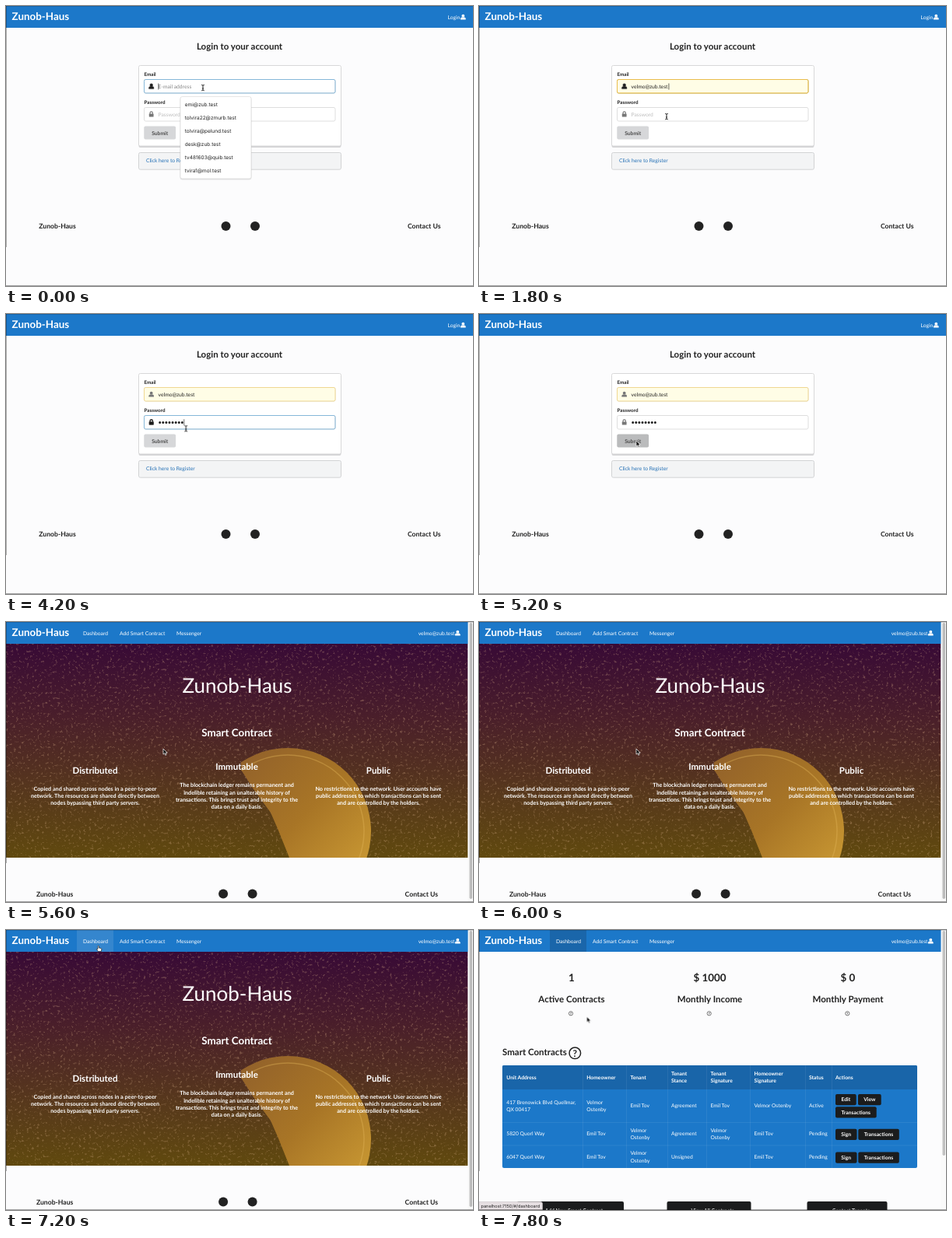
An HTML page for the animation above (8 s loop, 600 by 360 pixels).

```html
<!DOCTYPE html>
<html lang="en">
<head>
<meta charset="utf-8">
<title>Rental dashboard login</title>
<style>
html, body { margin: 0; width: 100%; height: 100%; overflow: hidden; background: #fcfcfd; }
svg { display: block; width: 100vw; height: 100vh; text-rendering: geometricPrecision; }
text { font: 6.72px Lato, sans-serif; fill: #212121; white-space: pre; }
.b, .b text { font-weight: 700; }
.c, .c text { text-anchor: middle; }
.w text, text.w { fill: #fff; }
.label { font-size: 6.3px; font-weight: 700; }
.brand { font-size: 13.4px; font-weight: 700; fill: #fff; }
.h1 { font-size: 13.4px; font-weight: 700; }
.h2 { font-size: 11.5px; font-weight: 700; }
.h4 { font-size: 7.2px; }
.foot text { font-size: 8.65px; font-weight: 700; }
.sys text, text.sys { font-family: Inter, sans-serif; font-size: 6.5px; }
.field { fill: #fff; stroke: #dedede; }
.focus { fill: none; stroke: #85b7d9; }
.btn { fill: #1b1c1d; }

/* 8 s loop, 200 ms = 2.5 % */
.k, .k tspan { animation: 8s step-end infinite; }
#login { animation-name: login }
#home { animation-name: home }
#dash { animation-name: dash }
#list { animation-name: first }
#hint { animation-name: hint }
#pick { animation-name: pick }
.first { animation-name: first }
#mail tspan { fill-opacity: 0; }
#mail .l1 { animation-name: l1 }
#mail .l2 { animation-name: l2 }
#mail .l3 { animation-name: l3 }
#mail .l4 { animation-name: l4 }
#filled { animation-name: filled }
.mailOn { animation-name: mailOn }
.passOn { animation-name: passOn }
#caret1 { animation-name: caret1 }
#passHint { animation-name: passHint }
#cover { animation-name: cover }
#submit { animation-name: submit }
#hover { animation-name: hover }
#mouse { animation-name: mouse }
#beam { animation-name: beam }
#arrow { animation-name: arrow }
#hand { animation-name: hand }

@keyframes login { 0% { opacity: 1 } 70%, to { opacity: 0 } }
@keyframes home { 0% { opacity: 0 } 70% { opacity: 1 } 92.5%, to { opacity: 0 } }
@keyframes dash { 0% { opacity: 0 } 92.5%, to { opacity: 1 } }
@keyframes first { 0% { opacity: 1 } 5%, to { opacity: 0 } }
@keyframes hint { 0% { opacity: 0 } 5% { opacity: 1 } 15%, to { opacity: 0 } }
@keyframes pick { 0% { opacity: 0 } 12.5%, to { opacity: 1 } }
@keyframes l1 { 0% { fill-opacity: 0 } 5%, to { fill-opacity: 1 } }
@keyframes l2 { 0% { fill-opacity: 0 } 7.5%, to { fill-opacity: 1 } }
@keyframes l3 { 0% { fill-opacity: 0 } 10%, to { fill-opacity: 1 } }
@keyframes l4 { 0% { fill-opacity: 0 } 12.5%, to { fill-opacity: 1 } }
@keyframes filled { 0% { opacity: 0 } 12.5%, to { opacity: 1 } }
@keyframes mailOn { 0% { opacity: 1 } 25%, to { opacity: 0 } }
@keyframes passOn { 0% { opacity: 0 } 25% { opacity: 1 } 65%, to { opacity: 0 } }
@keyframes caret1 {
  0% { transform: none } 5% { transform: translateX(3.4px) } 7.5% { transform: translateX(7px) }
  10% { transform: translateX(8.6px) } 12.5%, to { transform: translateX(48px) }
}
@keyframes passHint { 0% { opacity: 1 } 30%, to { opacity: 0 } }
@keyframes cover {
  0% { transform: none } 30% { transform: translateX(4.1px) } 32.5% { transform: translateX(8.2px) }
  35% { transform: translateX(12.3px) } 37.5% { transform: translateX(16.4px) } 40% { transform: translateX(20.5px) }
  42.5% { transform: translateX(28.7px) } 45%, to { transform: translateX(32.8px) }
}
@keyframes submit { 0% { fill: #d6d7d9 } 60% { fill: #cacbcd } 65%, to { fill: #babbbc } }
@keyframes hover { 0% { opacity: 0 } 90%, to { opacity: 1 } }
@keyframes mouse {
  0% { transform: translate(253px, 105px) }
  20% { transform: translate(247px, 124px) }
  22.5% { transform: translate(241px, 142px) }
  50% { transform: translate(241px, 142px); animation-timing-function: steps(4) }
  60% { transform: translate(202px, 163px) }
  80% { transform: translate(202px, 163px); animation-timing-function: steps(4) }
  90% { transform: translate(118px, 20px) }
  95% { transform: translate(124px, 60px) }
  97.5%, to { transform: translate(138.5px, 111.5px) }
}
@keyframes beam {
  0% { opacity: 1 } 5% { opacity: 0 } 20% { opacity: 1 } 27.5% { opacity: 0 }
  50% { opacity: 1 } 55%, to { opacity: 0 }
}
@keyframes arrow { 0% { opacity: 0 } 55% { opacity: 1 } 90% { opacity: 0 } 95%, to { opacity: 1 } }
@keyframes hand { 0% { opacity: 0 } 90% { opacity: 1 } 95%, to { opacity: 0 } }
</style>
</head>
<body>
<svg viewBox="0 0 600 360">
  <defs>
    <g id="user"><circle cy="-1.5" r="1.9"/><path d="M-3.3 3.2V2Q-3.3.3-1.5.3h3Q3.3.3 3.3 2v1.2z"/></g>
    <g id="lock"><rect x="-2.9" y="-.4" width="5.8" height="4" rx=".6"/><path d="M-1.7 0v-1.4a1.7 1.7 0 0 1 3.4 0V0" fill="none" stroke="currentColor" stroke-width="1.1"/></g>
    <g id="help"><circle r="2.6" fill="none" stroke="#212121" stroke-width=".6"/><text class="b c" y="1.5" style="font-size:4.2px">?</text></g>
    <g id="foot" class="foot">
      <text x="42.3" y="286">Zunob-Haus</text>
      <circle cx="282.5" cy="283" r="6" fill="#222"/>
      <circle cx="320" cy="283" r="6" fill="#222"/>
      <text x="516" y="286">Contact Us</text>
    </g>
    <g id="menu" class="w">
      <text x="99" y="16.8">Dashboard</text>
      <text x="146" y="16.8">Add Smart Contract</text>
      <text x="219" y="16.8">Messenger</text>
      <text x="576.5" y="16.8" text-anchor="end">velmo@zub.test</text>
      <use href="#user" x="580.3" y="14.2" fill="#fff"/>
    </g>
    <linearGradient id="soil" x2="0" y2="1">
      <stop stop-color="#380a36"/><stop offset=".35" stop-color="#4a1f2a"/>
      <stop offset=".7" stop-color="#57381c"/><stop offset="1" stop-color="#60490e"/>
    </linearGradient>
    <linearGradient id="gold" x2="1" y2="1">
      <stop stop-color="#8a5a2c"/><stop offset=".5" stop-color="#a87526"/><stop offset="1" stop-color="#d8a838"/>
    </linearGradient>
    <filter id="grain" x="0" y="0" width="1" height="1">
      <feTurbulence type="fractalNoise" baseFrequency=".3" numOctaves="4" seed="5"/>
      <feColorMatrix values="0 0 0 0 .68  0 0 0 0 .42  0 0 0 0 .24  5 0 0 0 -3"/>
    </filter>
    <clipPath id="dig"><path d="M302 150H480V303H364L350 268 340 245 318 215 302 190z"/></clipPath>
  </defs>

  <rect width="600" height="360" fill="#fcfcfd"/>
  <rect width="600" height="28" fill="#1c78c9"/>
  <text class="brand" x="7.6" y="18.4">Zunob-Haus</text>

  <g id="login" class="k">
    <text class="w" x="567.5" y="16.8">Login</text>
    <use href="#user" x="587.3" y="14.2" fill="#fff"/>
    <text class="h2 c" x="300" y="56.3">Login to your account</text>

    <rect x="170.5" y="77.5" width="260" height="104.5" rx="2" fill="#d4d4d5"/>
    <rect x="170.5" y="76.5" width="260" height="103.5" rx="2" fill="#fff" stroke="#d8d8d9"/>

    <text class="label" x="177.5" y="89.6">Email</text>
    <rect class="field" x="177.5" y="94.5" width="245.5" height="17.5" rx="2"/>
    <rect class="focus k mailOn" x="177.5" y="94.5" width="245.5" height="17.5" rx="2"/>
    <g id="filled" class="k">
      <rect x="177.5" y="94.5" width="245.5" height="17.5" rx="2" fill="#fffde6" stroke="#f0d892"/>
      <rect class="k mailOn" x="177.5" y="94.5" width="245.5" height="17.5" rx="2" fill="none" stroke="#e9bd4c"/>
    </g>
    <use href="#user" x="186.7" y="103.2" fill="#777"/>
    <use class="k mailOn" href="#user" x="186.7" y="103.2" fill="#1c1c1c"/>
    <text class="k first" x="195.6" y="105.7" style="fill:#878787">E-mail address</text>
    <text id="mail" class="k" x="195.6" y="105.7"><tspan class="l1">v</tspan><tspan class="l2">e</tspan><tspan class="l3">l</tspan><tspan class="l4">mo@zub.test</tspan></text>
    <g class="k mailOn"><path id="caret1" class="k" d="M195.9 99.5v8" stroke="#222" stroke-width=".7"/></g>

    <text class="label" x="177.5" y="125.6">Password</text>
    <rect class="field" x="177.5" y="130.5" width="245.5" height="17.5" rx="2"/>
    <path d="M197.7 139.4h29" stroke="#1c1c1c" stroke-width="3" stroke-linecap="round" stroke-dasharray="0 4.1"/>
    <g id="cover" class="k">
      <rect x="195.5" y="134" width="36" height="11" fill="#fff"/>
      <path class="k passOn" d="M195.9 135.3v8" stroke="#222" stroke-width=".7"/>
    </g>
    <text id="passHint" class="k" x="195.6" y="141.7" style="fill:#bdbdbd">Password</text>
    <rect class="focus k passOn" x="177.5" y="130.5" width="245.5" height="17.5" rx="2"/>
    <use href="#lock" x="186.7" y="139" fill="#777" color="#777"/>
    <use class="k passOn" href="#lock" x="186.7" y="139" fill="#1c1c1c" color="#1c1c1c"/>

    <rect id="submit" class="k" x="177.3" y="154.5" width="40.8" height="17" rx="2"/>
    <text class="b c" x="197.7" y="165.5" style="fill:#4c4c4c">Submit</text>

    <rect x="170.5" y="188.5" width="260" height="21.7" rx="2" fill="#f3f4f5" stroke="#d2d3d4"/>
    <text x="180" y="201.4" style="fill:#2470b6">Click here to Register</text>
    <use href="#foot"/>

    <g id="list" class="k sys">
      <rect x="223.5" y="117" width="92" height="106.5" rx="3" fill="#000" opacity=".1"/>
      <rect x="224" y="116.5" width="91" height="105.5" rx="2.5" fill="#fff" stroke="#d5d5d5" stroke-width=".6"/>
      <text x="229.8" y="129">emi@zub.test</text>
      <text x="229.8" y="146">tolvira22@zmurb.test</text>
      <text x="229.8" y="163">tolvira@pelund.test</text>
      <text x="229.8" y="180">desk@zub.test</text>
      <text x="229.8" y="197">tv481603@quib.test</text>
      <text x="229.8" y="214">tvira1@mol.test</text>
    </g>
    <g id="hint" class="k sys">
      <rect x="224" y="116.5" width="91" height="20.5" rx="2.5" fill="#fff" stroke="#d5d5d5" stroke-width=".6"/>
      <rect id="pick" class="k" x="224.5" y="118.5" width="90" height="16.5" fill="#e6e6e6"/>
      <text x="229.8" y="129">velmo@zub.test</text>
    </g>
  </g>

  <g id="home" class="k">
    <rect id="hover" class="k" x="91" width="47" height="28" fill="#3586ce"/>
    <use href="#menu"/>
    <rect y="28" width="593.5" height="275" fill="url(#soil)"/>
    <rect y="28" width="593.5" height="275" filter="url(#grain)" opacity=".32"/>
    <g clip-path="url(#dig)">
      <circle cx="362" cy="269" r="107" fill="url(#gold)"/>
      <circle cx="362" cy="269" r="98" fill="none" stroke="#e0b557" stroke-opacity=".4" stroke-width="1.5"/>
    </g>
    <g class="w c b">
      <text x="297" y="91" style="font-size:26px;font-weight:400">Zunob-Haus</text>
      <text class="h1" x="296.5" y="147">Smart Contract</text>
      <text class="h2" x="114.5" y="194.6">Distributed</text>
      <text class="h2" x="296.5" y="190">Immutable</text>
      <text class="h2" x="478.5" y="194.6">Public</text>
      <text class="h4" y="217"><tspan x="114.5">Copied and shared across nodes in a peer-to-peer</tspan><tspan x="114.5" dy="9.2">network. The resources are shared directly between</tspan><tspan x="114.5" dy="9.2">nodes bypassing third party servers.</tspan></text>
      <text class="h4" y="212.4"><tspan x="296.5">The blockchain ledger remains permanent and</tspan><tspan x="296.5" dy="9.2">indelible retaining an unalterable history of</tspan><tspan x="296.5" dy="9.2">transactions. This brings trust and integrity to the</tspan><tspan x="296.5" dy="9.2">data on a daily basis.</tspan></text>
      <text class="h4" y="217"><tspan x="478.5">No restrictions to the network. User accounts have</tspan><tspan x="478.5" dy="9.2">public addresses to which transactions can be sent</tspan><tspan x="478.5" dy="9.2">and are controlled by the holders.</tspan></text>
    </g>
    <use href="#foot" x="-3.4" y="66.5"/>
    <rect x="593.5" width="6.5" height="360" fill="#f8f8f8"/>
    <rect x="595.5" y="1" width="3.6" height="355" rx="1.8" fill="#bcbcbc"/>
  </g>

  <g id="dash" class="k">
    <rect x="91" width="47" height="28" fill="#1a66aa"/>
    <use href="#menu"/>
    <g class="c">
      <text class="h1" x="119" y="66">1</text>
      <text class="h1" x="296.5" y="66">$ 1000</text>
      <text class="h1" x="474" y="66">$ 0</text>
      <text class="h2" x="119" y="93">Active Contracts</text>
      <text class="h2" x="296.5" y="93">Monthly Income</text>
      <text class="h2" x="474" y="93">Monthly Payment</text>
    </g>
    <use href="#help" x="118" y="107.3"/>
    <use href="#help" x="295.7" y="107.3"/>
    <use href="#help" x="473.3" y="107.3"/>
    <text class="h2" x="30" y="161.3">Smart Contracts</text>
    <circle cx="123.3" cy="158.3" r="7.3" fill="none" stroke="#212121" stroke-width="1.5"/>
    <text class="b c" x="123.3" y="162.5" style="font-size:12px">?</text>

    <rect x="30" y="174" width="533" height="132" rx="2" fill="#1c78c9"/>
    <path d="M30 205v-29q0-2 2-2h529q2 0 2 2v29z" fill="#1965a9"/>
    <path d="M133.5 174v132M189.5 174v132M242.5 174v132M292.5 174v132M348.5 174v132M419.5 174v132M453.5 174v132M30 247.5h533M30 277h533" stroke="#fff" stroke-opacity=".1" stroke-width=".7"/>
    <g class="w b">
      <text x="35.3" y="191.8">Unit Address</text>
      <text x="138.3" y="191.8">Homeowner</text>
      <text x="194.5" y="191.8">Tenant</text>
      <text x="247" y="187">Tenant<tspan x="247" dy="9.4">Stance</tspan></text>
      <text x="297.5" y="187">Tenant<tspan x="297.5" dy="9.4">Signature</tspan></text>
      <text x="353.5" y="187">Homeowner<tspan x="353.5" dy="9.4">Signature</tspan></text>
      <text x="424" y="191.8">Status</text>
      <text x="458" y="191.8">Actions</text>
    </g>
    <g class="w">
      <text x="35.3" y="223.8">417 Brenowick Blvd Quellmar,<tspan x="35.3" dy="9.2">QX 00417</tspan></text>
      <text x="138.3" y="223.8">Velmor<tspan x="138.3" dy="9.2">Ostenby</tspan></text>
      <text x="194.5" y="228.4">Emil Tov</text>
      <text x="247" y="228.4">Agreement</text>
      <text x="297.5" y="228.4">Emil Tov</text>
      <text x="353.5" y="228.4">Velmor Ostenby</text>
      <text x="424" y="228.4">Active</text>

      <text x="35.3" y="264.4">5820 Quorl Way</text>
      <text x="138.3" y="264.4">Emil Tov</text>
      <text x="194.5" y="259.8">Velmor<tspan x="194.5" dy="9.2">Ostenby</tspan></text>
      <text x="247" y="264.4">Agreement</text>
      <text x="297.5" y="259.8">Velmor<tspan x="297.5" dy="9.2">Ostenby</tspan></text>
      <text x="353.5" y="264.4">Emil Tov</text>
      <text x="424" y="264.4">Pending</text>

      <text x="35.3" y="293.9">6047 Quorl Way</text>
      <text x="138.3" y="293.9">Emil Tov</text>
      <text x="194.5" y="289.3">Velmor<tspan x="194.5" dy="9.2">Ostenby</tspan></text>
      <text x="247" y="293.9">Unsigned</text>
      <text x="353.5" y="293.9">Emil Tov</text>
      <text x="424" y="293.9">Pending</text>
    </g>
    <g class="btn">
      <rect x="458" y="211" width="26.7" height="14.3" rx="2"/>
      <rect x="487" y="211" width="29.7" height="14.3" rx="2"/>
      <rect x="458" y="227.3" width="52.7" height="14.3" rx="2"/>
      <rect x="458" y="255.8" width="27.5" height="14.3" rx="2"/>
      <rect x="487.3" y="255.8" width="52.5" height="14.3" rx="2"/>
      <rect x="458" y="285.5" width="27.5" height="14.3" rx="2"/>
      <rect x="487.3" y="285.5" width="52.5" height="14.3" rx="2"/>
      <rect x="49" y="349" width="137" height="14" rx="2"/>
      <rect x="241.5" y="349" width="108" height="14" rx="2"/>
      <rect x="421.5" y="349" width="103" height="14" rx="2"/>
    </g>
    <g class="w b c">
      <text x="471.3" y="220.4">Edit</text>
      <text x="501.8" y="220.4">View</text>
      <text x="484.3" y="236.8">Transactions</text>
      <text x="471.7" y="265.3">Sign</text>
      <text x="513.5" y="265.3">Transactions</text>
      <text x="471.7" y="295">Sign</text>
      <text x="513.5" y="295">Transactions</text>
      <text x="122" y="363">Add New Smart Contract</text>
      <text x="300" y="363">View All Contracts</text>
      <text x="478" y="363">Contact Tenants</text>
    </g>
    <path d="M0 349.5h79q2.5 0 2.5 2.5v8H0z" fill="#e6dfe2" stroke="#cbc5c8" stroke-width=".6"/>
    <text class="sys" x="2.5" y="357" style="font-size:5.6px">panelhost:7150/#/dashboard</text>
    <rect x="593.5" width="6.5" height="360" fill="#fafafa"/>
    <rect x="595.5" y="1" width="3.6" height="289" rx="1.8" fill="#c1c1c1"/>
  </g>

  <path d="M0 .4h600" stroke="#000" stroke-opacity=".25" stroke-width=".8"/>
  <path d="M.4 0v310" stroke="#000" stroke-opacity=".45" stroke-width=".8"/>
  <path d="M0 359.6h600" stroke="#000" stroke-opacity=".5" stroke-width=".8"/>

  <g id="mouse" class="k">
    <path id="beam" class="k" d="M-1.8-3.6Q0-3.6 0-2.4Q0-3.6 1.8-3.6M0-2.4V2.6M-1.8 3.8Q0 3.8 0 2.6Q0 3.8 1.8 3.8M-.9 1h1.8" fill="none" stroke="#111" stroke-width=".9"/>
    <path id="arrow" class="k" d="M0 0v7.2l1.7-1.5 1.1 2.6 1.3-.6-1.1-2.5h2.3z" fill="#111" stroke="#fff" stroke-width=".7"/>
    <path id="hand" class="k" d="M0 .7Q.7-.5 1.4.7V3l2.7.6q.8.2.7 1.2L4.3 7.6H.4L-1.6 4.6q.4-1 1.6 0z" fill="#fff" stroke="#222" stroke-width=".7"/>
  </g>
</svg>
</body>
</html>
```
